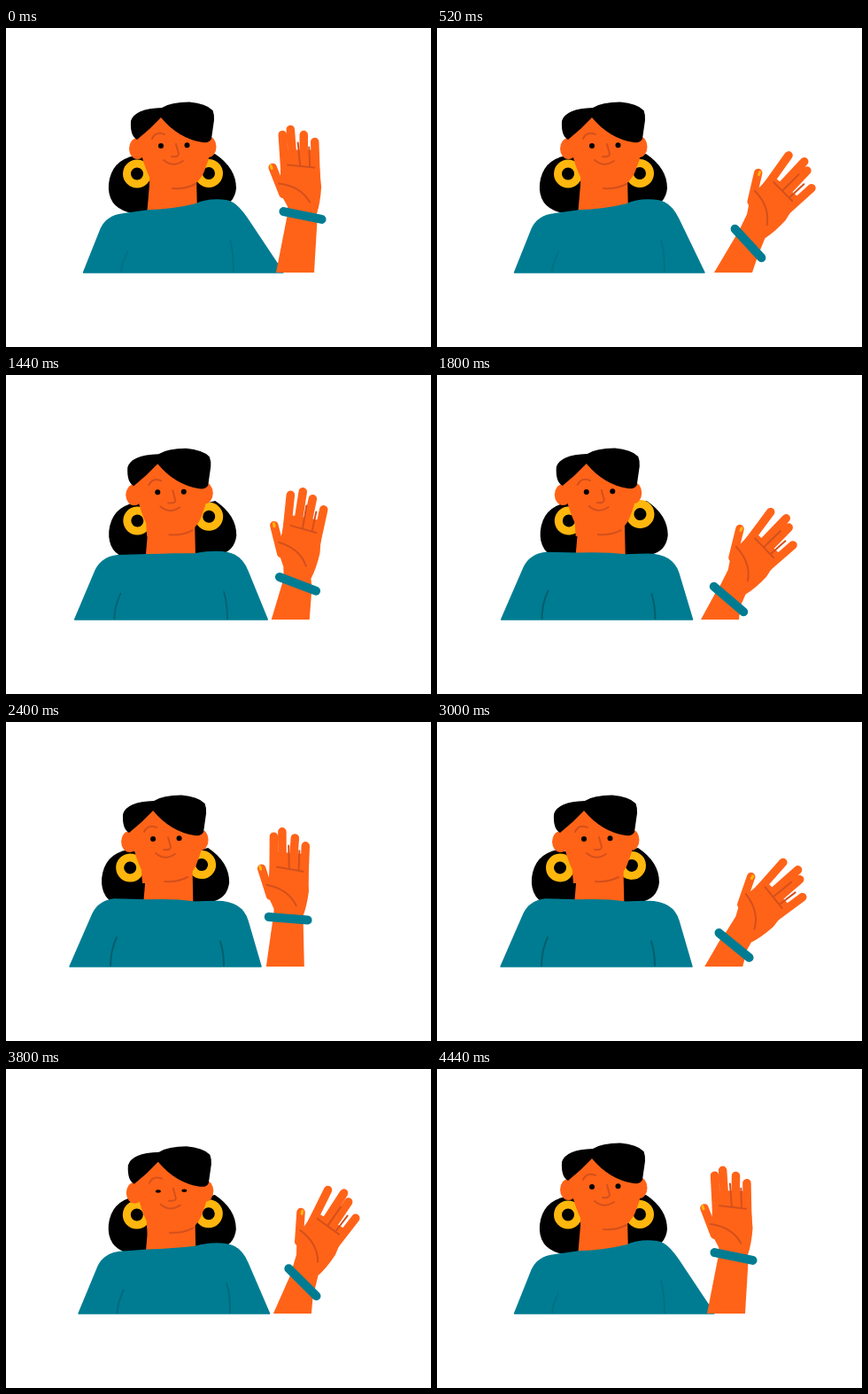
An HTML page that plays this animation: 480x360 px, repeating every 4480 ms.

```html
<!DOCTYPE html>
<html lang="en">
<head>
<meta charset="utf-8">
<title>Waving woman</title>
<style>
  html, body { margin: 0; width: 100%; height: 100%; overflow: hidden; background: #fff; }
  svg { display: block; width: 100vw; height: 100vh; }
  .skin { fill: #ff6318; }
  .finger { fill: none; stroke: #ff6318; stroke-width: 9.5; stroke-linecap: round; }
  .line { fill: none; stroke: #d4501c; stroke-width: 2; stroke-linecap: round; stroke-linejoin: round; }
  .teal { fill: #007c92; stroke: #007c92; stroke-width: 1.5; stroke-linejoin: round; }
  .fold { fill: none; stroke: #045e6e; stroke-width: 2; stroke-linecap: round; }
  .ring { fill: none; stroke: #ffb70e; stroke-width: 9; }
  .nail { fill: none; stroke: #ffb70e; stroke-width: 3; stroke-linecap: round; }
  .lid { fill: none; stroke: #000; stroke-width: 2; stroke-linecap: round; }
  .band { stroke: #007c92; stroke-width: 10; stroke-linecap: round; }
</style>
</head>
<body>
<svg viewBox="0 0 480 360">
  <g id="hair">
    <path d="M146 144Q119 149 116 176Q114 201 138 208H172V150Z"/>
    <path d="M236 142Q260 158 260 181Q258 199 240 203H205V150Z"/>
    <g id="rings">
      <circle class="ring" cx="148" cy="164.5" r="11.5"/>
      <circle class="ring" cx="229" cy="164" r="11.5"/>
    </g>
  </g>
  <path id="neck" class="skin" d="M163 165L159 212H216L215 165Z"/>
  <g id="head">
    <ellipse class="skin" cx="148.5" cy="136" rx="9.5" ry="12"/>
    <ellipse class="skin" cx="228.5" cy="134" rx="9" ry="12"/>
    <path class="skin" d="M148 118L178 98L232 120Q232 142 226 156Q222 170 212 177L190 183H163Q162 173 162 168Q153 150 148 118Z"/>
    <path d="M175 101Q163 114 148 126Q140 122 141 105Q145 91 176 90Q186 83.500 207 83.500Q226 85 233.500 93Q235.500 98 235 104L232 125Q230 130 222 129Q195 125 175 101Z"/>
    <path class="line" d="M165 125Q169 116 179 120M192 131L195 142Q195 146 187 145M178 149Q188 158 200 150M188 181Q203 182 214 176"/>
    <g id="eyes">
      <ellipse cx="175" cy="133" rx="3"/>
      <ellipse cx="204.500" cy="132.300" rx="3"/>
    </g>
    <path id="lids" class="lid" d="M172.500 134.500Q175.500 136.500 178.500 134.500M201.500 132.500Q204.500 134.500 207.500 132.500"/>
  </g>
  <path id="torso" class="teal"/>
  <path id="folds" class="fold"/>
  <path id="forearm" class="skin"/>
  <g id="hand">
    <path id="palm" class="skin"/>
    <path id="fingers" class="finger"/>
    <path id="creases" class="line"/>
    <path class="nail" d="M-36 -56L-35 -53"/>
  </g>
  <line id="band" class="band" x1="-22" x2="22"/>
</svg>
<script>
const LOOP = 4480, STEP = 40, WAVE = LOOP / 4, FLOOR = 276;

const part = {};
document.querySelectorAll('[id]').forEach(e => part[e.id] = e);
const eyes = part.eyes.querySelectorAll('ellipse');
const set = (id, name, value) => part[id].setAttribute(name, value);

const clamp = x => Math.min(1, Math.max(0, x));
const smooth = x => x * x * (3 - 2 * x);
const ease = (t, from, span) => smooth(clamp((t - from) / span));
const hold = (t, from, rise, to, fall) => ease(t, from, rise) - ease(t, to, fall);
const pulse = (t, mid, half) => smooth(clamp(1 - Math.abs(t - mid) / half));
const wave = t => smooth((1 - Math.cos(2 * Math.PI * t / WAVE)) / 2);
const mix = (a, b, k) => a + (b - a) * k;

function drawHead(t, lean, swing) {
  const nod = pulse(t, 3800, 400);
  const x = -9 * hold(t, 600, 1900, 3200, 1000), y = 4 * nod - lean;
  const open = 1 - pulse(t, 1120, 160) - .45 * pulse(t, 3780, 160);
  const shut = open < .35;

  set('hair', 'transform', `translate(${x + 7 * swing + 3 * nod} 0)`);
  set('rings', 'transform', `rotate(${-3.5 * swing - 1.5 * lean} 148 164)`);
  set('neck', 'transform', `translate(${x / 2} 0)`);
  set('head', 'transform', `translate(${x} ${y})`);
  set('eyes', 'transform', `translate(0 ${(1 - open) * 3})`);
  eyes.forEach(e => e.setAttribute('ry', shut ? 0 : 3 * open));
  set('lids', 'visibility', shut ? 'visible' : 'hidden');
}

function drawTorso(lean, sweep) {
  const left = mix(87.5, 72, lean);
  const right = mix(313, 288, lean) - 11 * sweep * (1 - lean);
  const ly = mix(210, 200, lean), ry = mix(194, 202.5, lean);
  const lx = .6 * left + 55, rx = 273, rEnd = ry + 22;
  const neckL = (ly + 202) / 2, neckR = (ry + 204) / 2;
  const bendX = rx - .35 * (right - rx), bendY = rEnd - .35 * (FLOOR - rEnd);

  set('torso', 'd', `M${left} ${FLOOR}L${lx} ${ly + 16}Q${lx + 7} ${ly + 2} ${lx + 24} ${ly}` +
    `L160 ${neckL}Q190 ${neckL - 1} 214 ${neckR}Q225 ${ry} 238 ${ry}` +
    `C252 ${ry} ${bendX} ${bendY} ${rx} ${rEnd}L${right} ${FLOOR}Z`);

  const fl = 130 - 12 * lean, fr = 257 - 11 * lean;
  set('folds', 'd', `M${fl} 275Q${fl} ${ly + 58} ${fl + 7} ${ly + 43}` +
    `M${fr} 275Q${fr} ${ry + 58} ${fr - 4} ${ry + 45}`);
  set('folds', 'opacity', mix(.35, 1, lean));
}

// The forearm sweeps sideways; the hand follows a little later.
function drawArm(t, sweep, follow, swing) {
  const drop = hold(t, 500, 600, 3200, 600);
  const shift = -14 * hold(t, 1100, 600, 3800, 640) - 6 * swing;
  const elbow = 305 + 8 * sweep + .75 * shift;
  const x = 335 + 16.5 * sweep + 1.1 * shift;
  const y = 211.5 + 31.5 * sweep + 10 * drop;
  const turn = 11.5 + 36 * sweep - 7 * drop;
  const tilt = 40.5 * follow + 5 * (drop - swing);
  const a = turn * Math.PI / 180, dx = 17 * Math.cos(a), dy = 17 * Math.sin(a);
  const reach = 14.5 * sweep, side = 5 * sweep, s = sweep;

  set('forearm', 'd', `M${elbow} ${FLOOR}L${x - dx} ${y - dy}L${x + dx} ${y + dy}L${elbow + 43} ${FLOOR}Z`);
  set('band', 'transform', `translate(${x} ${y}) rotate(${turn})`);
  set('hand', 'transform', `translate(${x} ${y}) rotate(${tilt}) translate(${-side} ${-reach})`);
  set('palm', 'd', `M-25 ${-74 + 12 * s}H17L21 -32Q20 -14 16 -2L${16 + side} ${reach}` +
    `H${side - 16}L-17 -10L-27 -28L-25 -48Z`);
  set('fingers', 'd', `M-23 -91L-20 -47M${9 * s - 14} -97L${2 * s - 10} -47` +
    `M${1 + 3 * s} -91L1 -47M${13.5 + 7 * s} ${4 * s - 83}L15 -42M${-34 - 3 * s} -54L-22 -24`);
  set('creases', 'd', `M-27 -36Q-2 -33 8 -15M-17 -57L13 -54` +
    `M${5 * s - 5.5} -82L-3 -56M${7 + 4 * s} -77L8 -55`);
}

const start = performance.now();
function draw() {
  const t = Math.floor((performance.now() - start) % LOOP / STEP) * STEP;
  const lean = hold(t, 700, 1250, 3200, 1000);
  const swing = pulse(t, 1800, 800);
  const beat = t - 80 * lean;
  const sweep = wave(beat);
  drawHead(t, lean, swing);
  drawTorso(lean, sweep);
  drawArm(t, sweep, wave(beat - 70), swing);
  requestAnimationFrame(draw);
}
draw();
</script>
</body>
</html>
```
